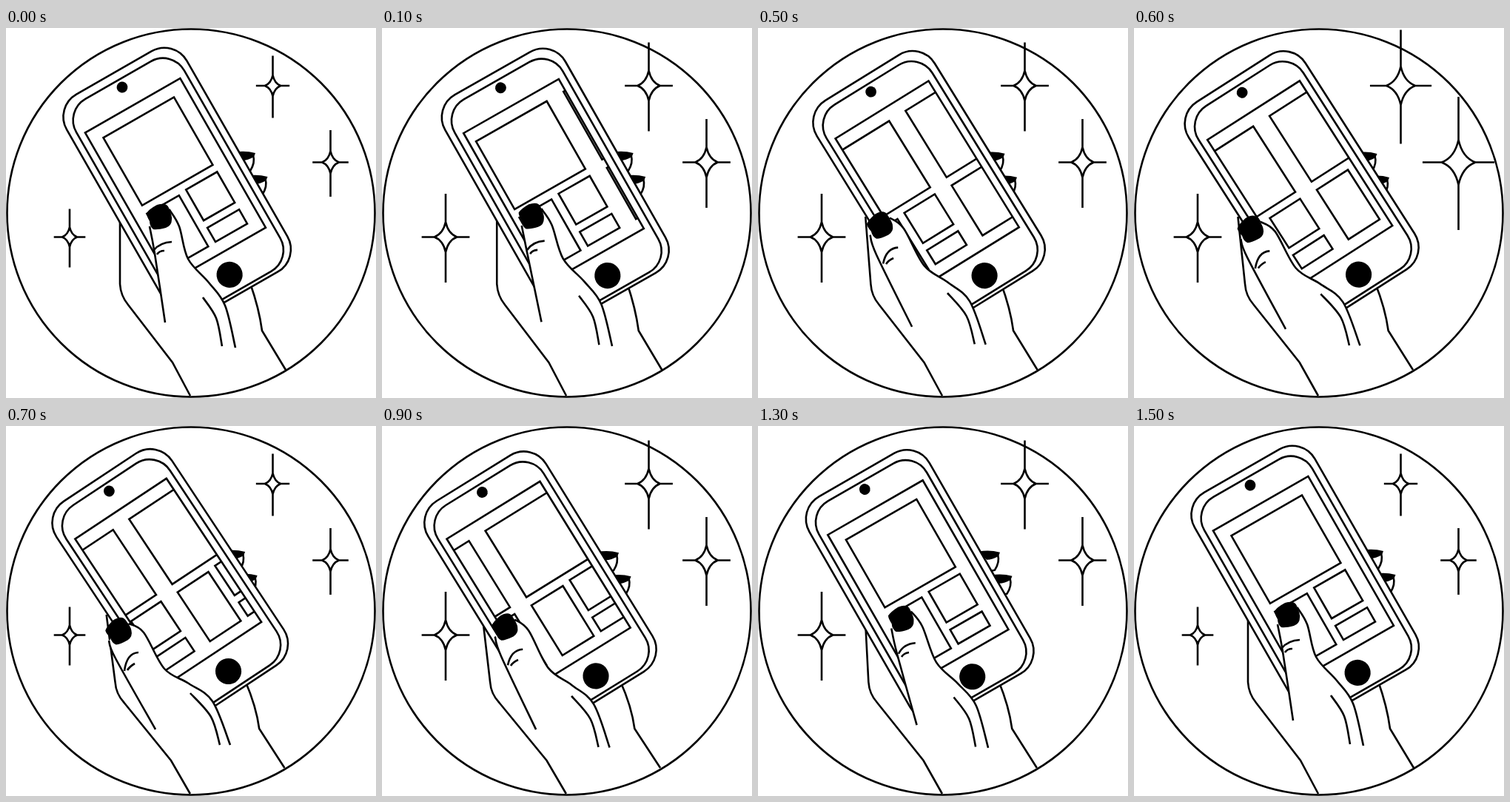
Animation, 500 px wide and 500 px high, one loop 1600 ms. Source, as an HTML page:

```html
<!DOCTYPE html>
<html lang="en">
<head>
<meta charset="utf-8">
<title>Swiping hand</title>
<style>
html, body { margin: 0; width: 100%; height: 100%; overflow: hidden; background: #fff; }
svg { display: block; width: 100vw; height: 100vh; }
.ink { fill: none; stroke: #000; stroke-width: 2.6; }
.paper { fill: #fff; }
.solid { fill: #000; stroke: none; }
</style>
</head>
<body>
<svg viewBox="0 0 500 500">
  <defs>
    <clipPath id="screen"><rect x="-74" y="28.5" width="148" height="232.5"/></clipPath>
    <g id="page">
      <rect x="-56" y="46.5" width="110" height="105.5"/>
      <rect x="-56" y="165" width="50" height="79.5"/>
      <rect x="6" y="163" width="48.5" height="48"/>
      <rect x="5.5" y="222" width="49.5" height="22"/>
    </g>
    <g id="finger">
      <path class="paper" d="M-2 2 Q1 12 -6 23 L-34 30 L-30 0 Z"/>
      <path class="solid" d="M1 -1 Q-14 -5 -28 -2 L-17 9 Q-9 9 -1 4 Z"/>
    </g>
  </defs>
  <rect width="500" height="500" fill="#fff"/>
  <g class="ink">
    <circle cx="250" cy="250" r="248.5"/>
    <path id="stars"/>
    <path id="arm"/>
    <g id="fingers">
      <use href="#finger"/>
      <use href="#finger" x="16.5" y="32"/>
    </g>
    <g id="phone">
      <rect class="paper" x="-93.5" y="-22.4" width="187" height="343.4" rx="35"/>
      <rect x="-84" y="-11" width="168" height="327" rx="33"/>
      <circle class="solid" r="7.4"/>
      <circle class="solid" cy="292" r="17.6"/>
      <rect x="-74" y="28.5" width="148" height="232.5"/>
      <g clip-path="url(#screen)">
        <g id="scroll">
          <use href="#page"/>
          <use href="#page" x="136"/>
        </g>
      </g>
    </g>
    <path id="palm" class="paper" style="stroke:none"/>
    <path id="lines"/>
    <path id="nail" class="solid" d="M-17 -5 Q-14 -10 -3 -16 Q10 -20 13 -12 Q18 0 17 4 Q17 12 9 15 Q-2 18 -8 17 Q-13 13 -13 6 Q-17 -1 -17 -5 Z"/>
  </g>
</svg>
<script>
const LOOP = 1600, STEP = 100, PAGE = 136;
const OUT = 700, BACK = 800;   // thumb swipes left, then returns

const { PI, sin, min, max, abs, floor } = Math;
const el = id => document.getElementById(id);
const draw = (id, d) => el(id).setAttribute('d', d);
const place = (id, [x, y], turn = 0) =>
  el(id).setAttribute('transform', `translate(${x} ${y}) rotate(${turn})`);
const add = ([x, y], dx, dy) => [x + dx, y + dy];

// Smooth curve through points, without its starting move
function curve(pts) {
  let d = '';
  for (let i = 0; i < pts.length - 1; i++) {
    const p = pts[i], q = pts[i + 1], o = pts[i - 1] || p, r = pts[i + 2] || q;
    const c1 = p.map((v, j) => v + (q[j] - o[j]) / 6);
    const c2 = q.map((v, j) => v - (r[j] - p[j]) / 6);
    d += `C${c1} ${c2} ${q}`;
  }
  return d;
}
const stroke = pts => `M${pts[0]}` + curve(pts);

function star(x, y, h) {
  const w = h * 0.54, a = w * 0.47, b = h * 0.34, k = 0.22, m = y + 1.5;
  const bend = (sx, sy) => `${x + sx * a * k} ${y + sy * b * k}`;
  return `M${x} ${m - h}V${y - b}M${x} ${y + b}V${m + h}` +
    `M${x - w} ${y}H${x - a}M${x + a} ${y}H${x + w}` +
    `M${x} ${y - b}Q${bend(1, -1)} ${x + a} ${y}Q${bend(1, 1)} ${x} ${y + b}` +
    `Q${bend(-1, 1)} ${x - a} ${y}Q${bend(-1, -1)} ${x} ${y - b}Z`;
}

function drawStars(frame) {
  const twinkle = (x, y, small, large) =>
    star(x, y, [small, 60, large, small][frame % 4]);
  draw('stars', twinkle(360.5, 78, 42, 77) + twinkle(438.5, 181.5, 45, 90) +
    twinkle(86, 282.5, 39.5, 60));
}

// k: how far the thumb has swiped; sway: the arm's swing, + going out, - coming back
function swipe(t) {
  if (t < OUT) {
    const x = t / OUT;
    return { k: x - 0.06 * sin(2 * PI * x), sway: sin(PI * x) };
  }
  const x = min(1, (t - OUT) / BACK);
  return { k: 1 - x, sway: -sin(PI * x) };
}

function render(ms) {
  const frame = floor((ms % LOOP) / STEP), t = frame * STEP;
  const { k, sway } = swipe(t);
  const out = max(0, sway), back = max(0, -sway);

  // The arm leans like a lever held at the bottom of the stage.
  const lean = (x, y) => [x + (500 - y) * (0.028 * sway - 0.042 * k), y];
  // Points of the palm slide from one place to another, lifted by the swing.
  const slide = (x, y, x2, y2) =>
    [x + (x2 - x) * k + 4 * abs(sway), y + (y2 - y) * k - 4.5 * sway];

  drawStars(frame);

  place('phone', add(lean(157, 80), 0, 8 * k + 5 * back), -29.8 - 3.7 * k + 1.2 * abs(sway));
  place('scroll', [-PAGE * min(1, (t / 1145) ** 1.12), 0]);
  place('fingers', add(lean(336, 170), 0, k + 2 * back));

  const elbow = lean(154, 346);
  const knee = lean(346, 409);
  draw('arm', `M${lean(154 - 8 * k, 255)}L${elbow}Q${add(elbow, 1, 16)} ${lean(165, 374)}` +
    `L${lean(225, 452)}L${lean(249, 497)}` +
    `M${lean(330, 345)}Q${add(knee, -4, -30)} ${knee}L${lean(378, 462)}`);

  const nail = [207 - 55 * k, 255 + 22 * k - 7 * out];
  place('nail', nail, -15 * k);

  const left = [
    add(nail, -13, 13),
    add(nail, -6 + 2 * k, 50 - 13 * k),
    slide(215, 398, 202, 410)];
  const right = [
    add(nail, 13.5, -10),
    add(nail, 27 + 7 * k, 13 - 11 * k),
    slide(246, 312, 214, 328),
    slide(274, 344, 247, 348),
    slide(296, 375, 279, 372),
    slide(310, 432, 303, 431)];
  const crease = [
    slide(266, 364, 249, 361),
    slide(284, 392, 277, 393),
    slide(292, 430, 289, 431)];
  const rim = right.slice().reverse();
  draw('palm', stroke(left) + `L232 432L${rim[0]}` + curve(rim) + 'Z');

  const wrinkle = add(nail, 17 + 10 * k, 34 - 5 * k);
  draw('lines', stroke(left) + stroke(right) + stroke(crease) +
    `M${wrinkle}q-16 1 ${-24 + 5 * k} ${11 + 14 * k}` +
    `M${add(wrinkle, -20 + 5 * k, 17 + 7 * k)}q3 -5 10 ${-5 - 4 * k}`);
}

const start = performance.now();
function tick() {
  render(performance.now() - start);
  requestAnimationFrame(tick);
}
tick();
</script>
</body>
</html>
```
